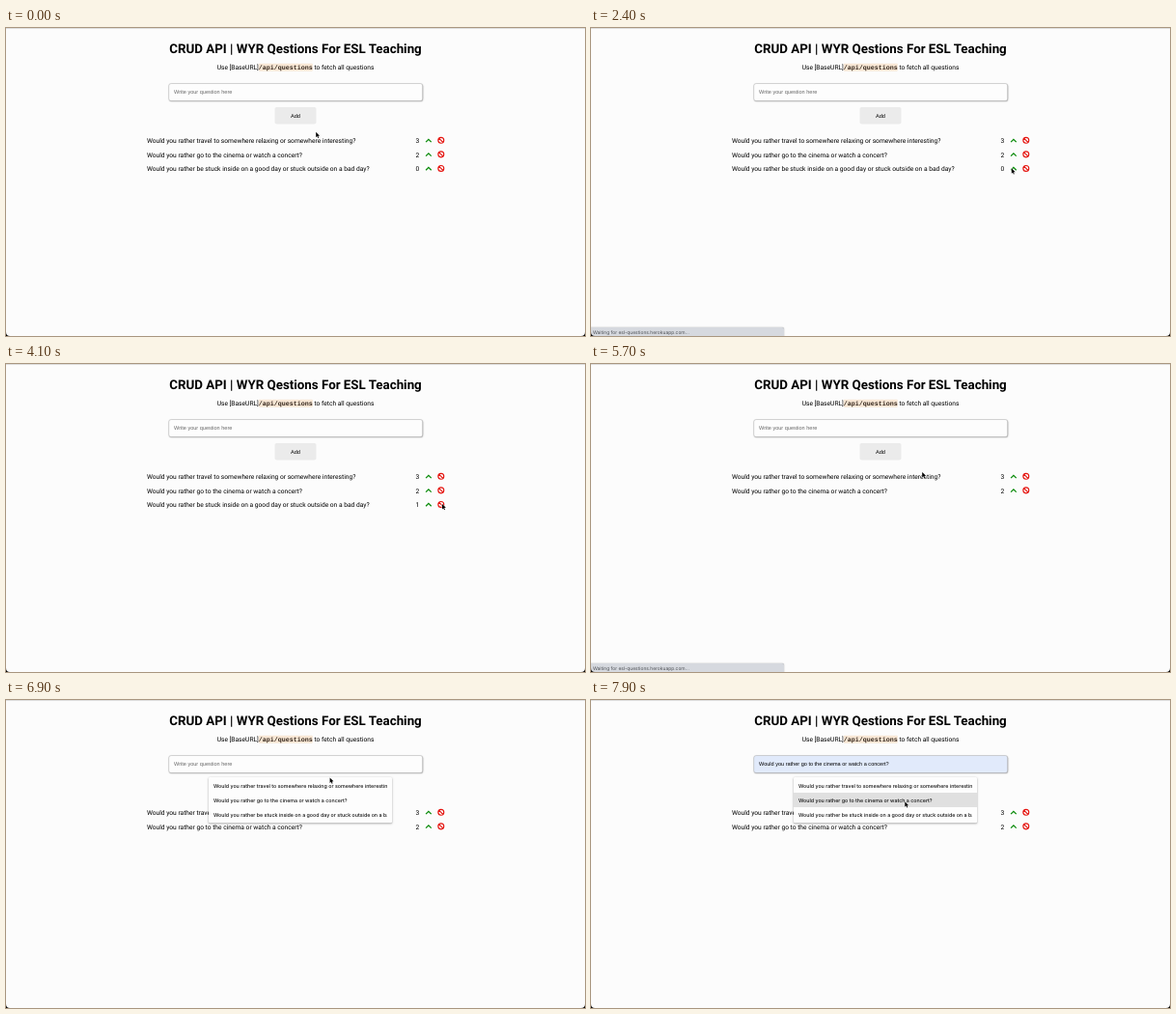
An HTML page with a canvas that plays this animation: 600 px wide and 319 px high, repeating every 8000 ms.

```html
<!DOCTYPE html>
<html lang="en">
<head>
<meta charset="utf-8">
<title>Question list</title>
<style>
  html, body { margin: 0; width: 100%; height: 100%; overflow: hidden; background: #fcfcfc; }
  canvas { display: block; width: 600px; height: 319px; }
</style>
</head>
<body>
<canvas id="stage"></canvas>
<script>
const W = 600, H = 319, LOOP = 8000, STEP = 100;
const PX = 600 / 1440; // page pixels to stage pixels
const PAPER = '#fcfcfc', RED = '#e5140f', GREEN = '#088a08';
const MENU_TOP = 81, MENU_ROW = 15;
const canvas = document.getElementById('stage');
const ctx = canvas.getContext('2d');
const ratio = window.devicePixelRatio || 1;
canvas.width = Math.round(W * ratio);
canvas.height = Math.round(H * ratio);

const font = (px, family, weight = 400) => `${weight} ${px * PX}px ${family}`;
const BODY = font(16, 'Roboto, sans-serif');
const TITLE = font(32, 'Roboto, sans-serif', 700);
const CODE = font(16, '"Liberation Mono", monospace', 700);
const FIELD = font(13.333, '"Liberation Sans", Arial, sans-serif');
const MENU = font(12.75, 'Inter, sans-serif', 500);
const STATUS = font(11.8, 'Inter, sans-serif');

const questions = [
  'Would you rather travel to somewhere relaxing or somewhere interesting?',
  'Would you rather go to the cinema or watch a concert?',
  'Would you rather be stuck inside on a good day or stuck outside on a bad day?'
];

// Eased pointer moves; bow bends the path downwards
const home = { x: 321.2, y: 107.8 };
const moves = [
  { start: 200, end: 1100, x: 435.8, y: 145.3, bow: 30 },   // to the vote arrow
  { start: 2600, end: 3100, x: 473, y: 148, bow: 0 },       // aside
  { start: 3100, end: 4100, x: 452, y: 145, bow: 0 },       // to the delete icon
  { start: 4900, end: 5700, x: 343.2, y: 112, bow: 0 },     // towards the field
  { start: 5700, end: 6400, x: 336.5, y: 69, bow: 0 },      // into the field
  { start: 6800, end: 6900, x: 335.6, y: 80.5, bow: 0 },    // out below it
  { start: 6900, end: 7700, x: 329, y: 94, bow: 0 },        // over the first entry
  { start: 7700, end: 7900, x: 325.3, y: 105.3, bow: 0 }    // over the second entry
];

function pointerAt(t) {
  let { x, y } = home;
  for (const m of moves) {
    const k = Math.min(1, Math.max(0, (t - m.start) / (m.end - m.start)));
    const e = k * k * (3 - 2 * k);
    x += (m.x - x) * e;
    y += (m.y - y) * e + m.bow * Math.sin(Math.PI * e);
  }
  return { x, y };
}

function text(str, x, y, style, color = '#000', align = 'left') {
  ctx.font = style;
  ctx.fillStyle = color;
  ctx.textAlign = align;
  ctx.fillText(str, x, y);
}

function box(x, y, w, h, radius, fill, shadow) {
  ctx.save();
  if (shadow) {
    ctx.shadowColor = shadow.color;
    ctx.shadowBlur = shadow.blur * ratio;
    ctx.shadowOffsetX = shadow.x * ratio;
    ctx.shadowOffsetY = shadow.y * ratio;
  }
  ctx.beginPath();
  ctx.roundRect(x, y, w, h, radius);
  ctx.fillStyle = fill;
  ctx.fill();
  ctx.restore();
}

function outline(color, width) {
  ctx.strokeStyle = color;
  ctx.lineWidth = width;
  ctx.stroke();
}

function header() {
  text('CRUD API | WYR Qestions For ESL Teaching', W / 2, 26, TITLE, '#000', 'center');
  const parts = [['Use [BaseURL]', BODY], ['/api/questions', CODE], [' to fetch all questions', BODY]];
  const widths = parts.map(([str, style]) => {
    ctx.font = style;
    return ctx.measureText(str).width;
  });
  let x = (W - widths.reduce((a, b) => a + b)) / 2;
  parts.forEach(([str, style], i) => {
    if (style === CODE) box(x, 36.8, widths[i], 8, 0.8, '#f8e7d5');
    text(str, x, 42.9, style, style === CODE ? '#33261c' : '#000');
    x += widths[i];
  });
}

function form(preview) {
  box(168.7, 57.5, 263, 18, 2.5, preview ? '#e1eafb' : '#fdfdfd',
    { color: '#888', blur: 1.4, x: 0.4, y: 0.4 });
  ctx.beginPath();
  ctx.roundRect(168.7, 57.5, 263, 18, 2.5);
  outline('#b0b0b0', 0.5);
  text(preview || 'Write your question here', 174, 68.4, FIELD, preview ? '#000' : '#666');
  box(278.5, 82, 43, 17.5, 2, '#ebebeb');
  text('Add', W / 2, 92.5, FIELD, '#000', 'center');
}

function row(str, votes, i) {
  const y = 116.3 + i * 14.55;
  text(str, 145.9, y + 2.8, BODY);
  text(votes, 424.4, y + 2.8, BODY);

  ctx.beginPath();
  ctx.moveTo(435.1, y + 1.8);
  ctx.lineTo(437.9, y - 1);
  ctx.lineTo(440.7, y + 1.8);
  outline(GREEN, 1.3);

  ctx.beginPath();
  ctx.arc(450.8, y, 2.95, 0, Math.PI * 2);
  ctx.moveTo(448.8, y - 2);
  ctx.lineTo(452.8, y + 2);
  outline(RED, 1.15);
}

function menu(active) {
  box(210, 80, 190, 47.3, 1.2, '#fdfdfd', { color: 'rgba(0,0,0,.4)', blur: 2.2, x: 0, y: 0.8 });
  if (active >= 0) box(210, MENU_TOP + active * MENU_ROW, 190, MENU_ROW, 0, '#e0e0e0');
  ctx.save();
  ctx.beginPath();
  ctx.rect(214, 80, 181, 47);
  ctx.clip();
  questions.forEach((q, i) => text(q, 215, MENU_TOP + 9.7 + i * MENU_ROW, MENU, '#111'));
  ctx.restore();
}

function statusBar() {
  box(-1, 310, 201, 11, [0, 2, 0, 0], '#d6d9df', { color: 'rgba(0,0,0,.45)', blur: 1.2, x: 0, y: 0 });
  text('Waiting for esl-questions.herokuapp.com...', 2, 316.6, STATUS, '#4c4f54');
}

function pointer({ x, y }) {
  const overField = y > 57 && y < 76;
  ctx.save();
  ctx.translate(x, y);
  ctx.scale(0.35, 0.35);
  ctx.beginPath();
  if (overField) {
    ctx.moveTo(0, -8);
    ctx.lineTo(0, 8);
    for (const end of [-8, 8]) {
      ctx.moveTo(-3, end);
      ctx.lineTo(3, end);
    }
    outline('#000', 1.4);
  } else {
    [[0, 0], [0, 15.5], [3.6, 12.2], [6, 17.8], [8.5, 16.7], [6.1, 11.3], [11, 11]]
      .forEach(([px, py]) => ctx.lineTo(px, py));
    ctx.closePath();
    outline('#fff', 2);
    ctx.fillStyle = '#000';
    ctx.fill();
  }
  ctx.restore();
}

function windowEdges() {
  ctx.fillStyle = '#dedede';
  ctx.fillRect(0, 0, W, 1);
  ctx.beginPath();
  ctx.rect(0, 0, W, H);
  ctx.roundRect(0, -10, W, H + 10, 4);
  ctx.fillStyle = '#000';
  ctx.fill('evenodd');
}

function draw(t) {
  const between = (from, to) => t >= from && t < to;
  const at = pointerAt(t);
  const menuOpen = t >= 6900;
  const active = menuOpen ? Math.floor((at.y - MENU_TOP) / MENU_ROW) : -1;
  const loading = between(2200, 3400) || between(5000, 6000);
  const votes = [3, 2, t < 2800 ? 0 : 1];
  const shown = t < 5300 ? 3 : 2;

  ctx.setTransform(ratio, 0, 0, ratio, 0, 0);
  ctx.textRendering = 'geometricPrecision';
  ctx.fillStyle = PAPER;
  ctx.fillRect(0, 0, W, H);
  header();
  form(questions[active]);
  questions.slice(0, shown).forEach((q, i) => row(q, votes[i], i));
  if (menuOpen) menu(active);
  if (loading) statusBar();
  pointer(at);
  windowEdges();
}

function tick() {
  const t = performance.now() % LOOP;
  draw(Math.floor(t / STEP) * STEP);
  requestAnimationFrame(tick);
}
tick();
</script>
</body>
</html>
```
